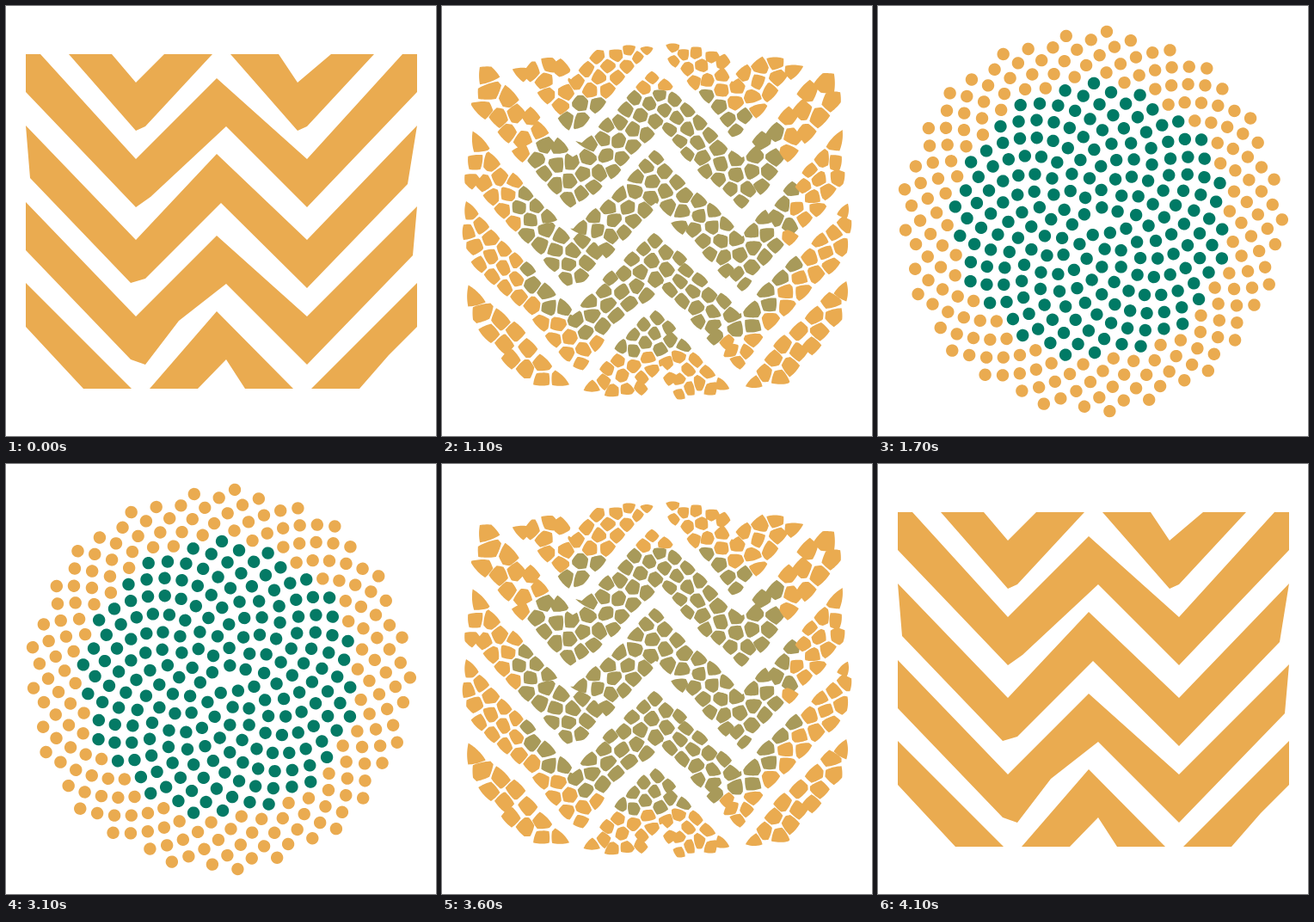
These frames come from a looping animation (500x500 px, 4800 ms). An HTML page:

```html
<!DOCTYPE html>
<html lang="en">
<head>
<meta charset="utf-8">
<title>Chevrons and sunflower</title>
<style>
html, body { margin: 0; width: 100%; height: 100%; overflow: hidden; background: #fff; }
svg { display: block; width: 100%; height: 100%; }
</style>
</head>
<body>
<svg viewBox="0 0 500 500"><path id="inner"/><path id="outer"/></svg>
<script>
const ORANGE = [234, 171, 80], TEAL = [0, 122, 101];
const DOTS = 380, TEAL_DOTS = 197, DOT_R = 7.2, STEPS = 11, GRID = 4;

const stripes = [
  '73,56 123,56 151,89 184,56 240,56 162,140 151,145',
  '261,56 317,56 339,89 378,56 428,56 350,140 339,145',
  '23,56 40,56 151,178 245,84 350,178 461,56 478,56 478,100 350,234 256,140 168,222 151,234 23,100',
  '23,139 151,272 245,172 350,272 478,139 467,207 350,328 250,229 162,317 145,322 28,200',
  '23,228 151,361 245,267 350,361 478,233 473,290 350,417 256,323 201,366 162,417 145,411 23,284',
  '23,322 146,445 90,445 23,373',
  '167,445 245,355 334,445 278,445 256,411 223,445',
  '478,322 478,373 445,406 411,445 355,445'
].map(s => s.split(' ').map(p => p.split(',').map(Number)));

const dist2 = (a, b) => (a[0] - b[0]) ** 2 + (a[1] - b[1]) ** 2;
const mix = (a, b, t) => a + (b - a) * t;
const mixPoint = (a, b, t) => [mix(a[0], b[0], t), mix(a[1], b[1], t)];

function nearest(list, p) {
  let best = null, bestD = Infinity;
  for (const item of list) {
    const d = dist2(item.pos, p);
    if (d < bestD) { bestD = d; best = item; }
  }
  return best;
}

function inside([x, y], poly) {
  let hit = false;
  poly.forEach(([ax, ay], i) => {
    const [bx, by] = poly[(i + 1) % poly.length];
    if (ay > y !== by > y && x < ax + (y - ay) / (by - ay) * (bx - ax)) hit = !hit;
  });
  return hit;
}

// Keeps the part of poly that is closer to a than to b.
function clip(poly, a, b) {
  const nx = b[0] - a[0], ny = b[1] - a[1];
  const c = nx * (a[0] + b[0]) / 2 + ny * (a[1] + b[1]) / 2;
  const side = p => nx * p[0] + ny * p[1] - c;
  const out = [];
  poly.forEach((p, i) => {
    const q = poly[(i + 1) % poly.length], sp = side(p), sq = side(q);
    if (sp <= 0) out.push(p);
    if (sp <= 0 !== sq <= 0) out.push(mixPoint(p, q, sp / (sp - sq)));
  });
  return out;
}

// Golden-angle spiral
function dotAt(i) {
  const a = i * Math.PI * (3 - Math.sqrt(5)), r = 11.41 * Math.sqrt(i);
  return [248.3 + r * Math.cos(a), 250 - r * Math.sin(a)];
}

// Stretches the rim of the disc to the rectangle of the stripes.
function toRect([px, py]) {
  const x = px - 248.3, y = py - 250, r = Math.hypot(x, y), R = 224;
  const edge = r * Math.min(227 / Math.abs(x), 194 / Math.abs(y));
  const f = 1 + (edge / R - 1) * (r / R) ** 3;
  return [250.5 + x * f, 250.5 + y * f];
}

function makeSites() {
  const samples = [];
  for (let y = 56; y < 446; y += GRID)
    for (let x = 24; x < 479; x += GRID) {
      const stripe = stripes.findIndex(s => inside([x, y], s));
      if (stripe >= 0) samples.push({ pos: [x, y], stripe });
    }
  const sites = [];
  for (let i = 1; i <= DOTS; i++) {
    const dot = dotAt(i), p = toRect(dot), s = nearest(samples, p);
    sites.push({ dot, teal: i <= TEAL_DOTS, stripe: s.stripe, pos: mixPoint(s.pos, p, 0.2) });
  }
  stripes.forEach((_, k) => {
    const own = sites.filter(s => s.stripe === k);
    const area = samples.filter(s => s.stripe === k);
    for (let round = 0; round < 10; round++) {
      own.forEach(s => { s.sum = [0, 0, 0]; });
      for (const { pos } of area) {
        const { sum } = nearest(own, pos);
        sum[0] += pos[0]; sum[1] += pos[1]; sum[2]++;
      }
      for (const s of own) if (s.sum[2]) s.pos = [s.sum[0] / s.sum[2], s.sum[1] / s.sum[2]];
    }
  });
  return sites;
}

// Pairs points on the outline of a cell with points on its dot.
function makePiece(site, sites) {
  const [cx, cy] = site.pos;
  let cell = stripes[site.stripe];
  for (const other of sites)
    if (other !== site && other.stripe === site.stripe) cell = clip(cell, site.pos, other.pos);
  if (cell.length < 3) cell = [[cx - 2, cy - 2], [cx + 2, cy - 2], [cx + 2, cy + 2], [cx - 2, cy + 2]];

  const from = [], along = [];
  let length = 0;
  cell.forEach((p, i) => {
    const q = cell[(i + 1) % cell.length], d = Math.sqrt(dist2(p, q)), n = Math.max(1, Math.ceil(d / 2.5));
    for (let j = 0; j < n; j++) {
      from.push(mixPoint(p, q, j / n));
      along.push(length + d * j / n);
    }
    length += d;
  });
  const turn = along.map(l => l / length * 2 * Math.PI);
  let sx = 0, sy = 0;
  from.forEach(([x, y], i) => {
    const a = Math.atan2(y - cy, x - cx) - turn[i];
    sx += Math.cos(a); sy += Math.sin(a);
  });
  const start = Math.atan2(sy, sx);
  const to = turn.map(a => [
    site.dot[0] + DOT_R * Math.cos(start + a),
    site.dot[1] + DOT_R * Math.sin(start + a)
  ]);
  return { from, to, teal: site.teal };
}

// Colours blend in Lab space.
const WHITE = [0.9505, 1, 1.089];
function toLab(rgb) {
  const [r, g, b] = rgb.map(v => v / 255).map(v => v > 0.04045 ? ((v + 0.055) / 1.055) ** 2.4 : v / 12.92);
  const [x, y, z] = [
    0.4124 * r + 0.3576 * g + 0.1805 * b,
    0.2126 * r + 0.7152 * g + 0.0722 * b,
    0.0193 * r + 0.1192 * g + 0.9505 * b
  ].map((v, i) => Math.cbrt(v / WHITE[i]));
  return [116 * y - 16, 500 * (x - y), 200 * (y - z)];
}
function toRgb([l, a, b]) {
  const fy = (l + 16) / 116;
  const [x, y, z] = [fy + a / 500, fy, fy - b / 200].map((v, i) => v ** 3 * WHITE[i]);
  return [
    3.2406 * x - 1.5372 * y - 0.4986 * z,
    -0.9689 * x + 1.8758 * y + 0.0415 * z,
    0.0557 * x - 0.204 * y + 1.057 * z
  ].map(v => v > 0.0031308 ? 1.055 * v ** (1 / 2.4) - 0.055 : 12.92 * v)
    .map(v => Math.round(255 * Math.min(1, Math.max(0, v))));
}
const labA = toLab(ORANGE), labB = toLab(TEAL);
const css = rgb => `rgb(${rgb.join(',')})`;

const sites = makeSites();
const pieces = sites.map(s => makePiece(s, sites));
const inner = document.getElementById('inner'), outer = document.getElementById('outer');
outer.setAttribute('fill', css(ORANGE));

const outline = pts => 'M' + pts.map(p => p[0].toFixed(2) + ' ' + p[1].toFixed(2)).join('L') + 'Z';
const ease = t => t < 0.5 ? 4 * t ** 3 : 1 - 4 * (1 - t) ** 3;
const clampStep = n => Math.min(STEPS, Math.max(0, n));

function stepAt(ms) {
  const tick = Math.floor(ms % 4800 / 100);
  return tick < 31 ? clampStep(tick - 6) : STEPS - clampStep(tick - 30);
}

function draw(step) {
  if (step === 0) {
    inner.setAttribute('d', '');
    outer.setAttribute('d', stripes.map(outline).join(''));
    return;
  }
  const t = ease(step / STEPS);
  const shape = teal => pieces.filter(p => p.teal === teal)
    .map(p => outline(p.from.map((q, i) => mixPoint(q, p.to[i], t)))).join('');
  inner.setAttribute('d', shape(true));
  outer.setAttribute('d', shape(false));
  inner.setAttribute('fill', css(toRgb(labA.map((v, i) => mix(v, labB[i], t)))));
}

let shown = -1;
function frame() {
  const step = stepAt(performance.now());
  if (step !== shown) draw(shown = step);
  requestAnimationFrame(frame);
}
frame();
</script>
</body>
</html>
```
